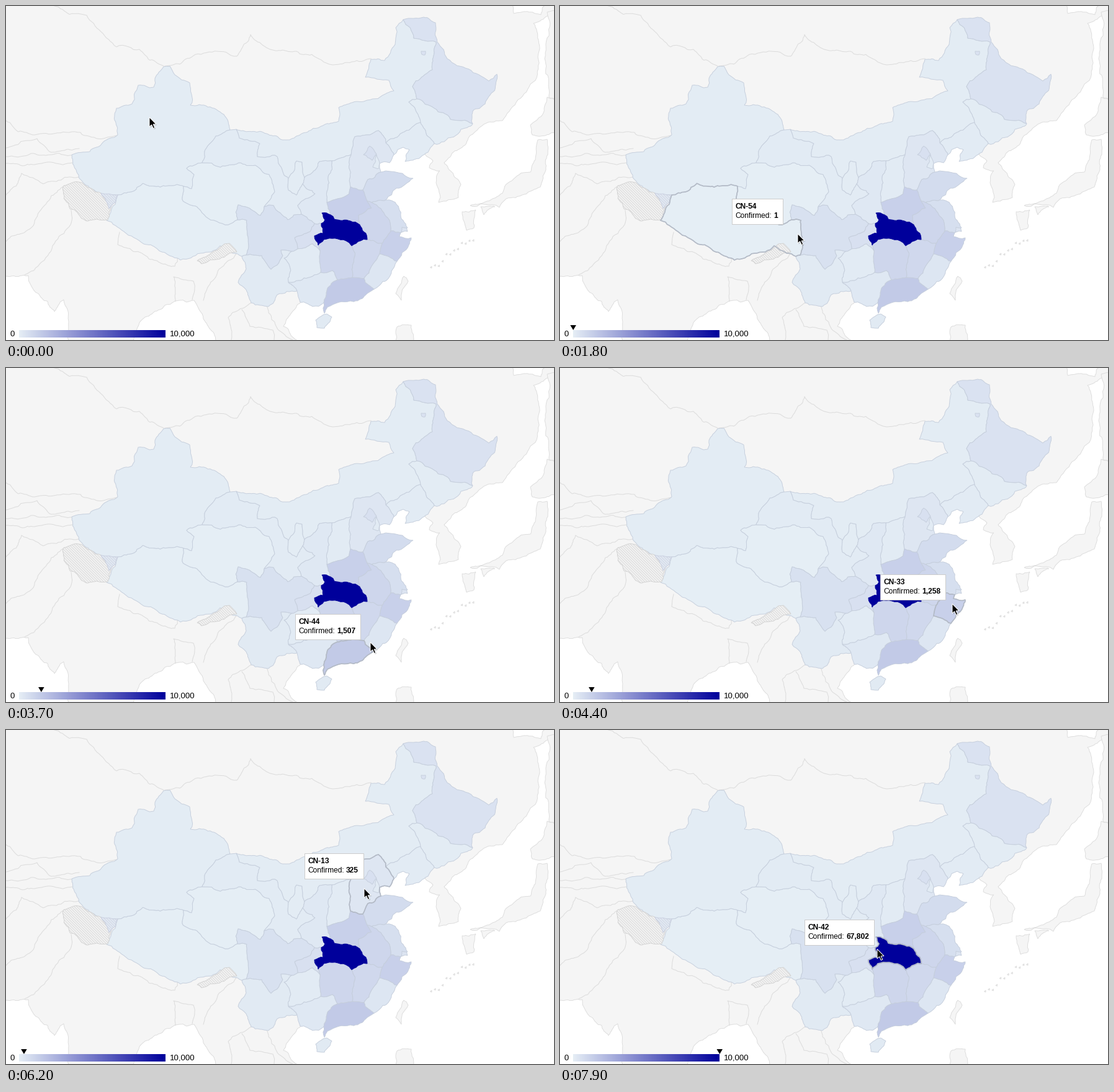
Recreate the animation shown at these times as a matplotlib script. Size 883 by 539 pixels, loop 8 s.

```python
import numpy as np
import matplotlib.pyplot as plt
from itertools import combinations
from matplotlib.animation import FuncAnimation
from matplotlib.patches import Polygon, Rectangle
from matplotlib.path import Path

W, H, DPI = 883, 539, 100
STEP, FRAMES = 100, 80
PT = 72 / DPI
LAND, LINE, EDGE = "#f5f5f5", "#dcdcdc", "#c5cedc"
LOW, HIGH = np.array([229, 238, 245]) / 255, np.array([0, 0, 155]) / 255
X0, X1 = 21, 257

fig = plt.figure(figsize=(W / DPI, H / DPI), dpi=DPI, facecolor=LAND)
ax = fig.add_axes([0, 0, 1, 1])
ax.axis("off")


def split(a, b, rng, wild):
    """Fractal midpoint displacement between two points, without the last one."""
    d = b - a
    if np.hypot(*d) < 5:
        return [a]
    mid = (a + b) / 2 + np.clip(rng.normal(0, wild), -0.15, 0.15) * np.array([-d[1], d[0]])
    return split(a, mid, rng, wild) + split(mid, b, rng, wild)


def rough(pts, wild=0.07):
    pts = np.array(pts, float).reshape(-1, 2)
    rng = np.random.default_rng(int(pts.sum()))
    out = []
    for a, b in zip(pts[:-1], pts[1:]):
        out += split(a, b, rng, wild)
    return np.array(out + [pts[-1]])


def line(*flat):
    p = rough(flat)
    ax.plot(p[:, 0], p[:, 1], color=LINE, lw=PT, zorder=2)


def area(*flat, fill=LAND, edge=LINE, z=1, **kw):
    p = rough(flat + flat[:2])
    return ax.add_patch(Polygon(p, fc=fill, ec=edge, lw=0.9 * PT, zorder=z, **kw))


def shade_of(count):
    return LOW + (HIGH - LOW) * min(count / 10000, 1)


# Seas; China is painted over the eastern one
area(-5, 435, 36, 435, 52, 464, 78, 493, 93, 474, 103, 545, -5, 545, fill="white")
area(204, 545, 215, 511, 256, 483, 303, 475, 318, 505, 342, 545, fill="white")
area(474, 545, 447, 517, 475, 478, 600, 420, 605, 300, 585, 260, 605, 235, 640, 222,
     675, 239, 688, 250, 682, 261, 699, 266, 693, 285, 697, 317, 729, 309, 733, 288,
     706, 253, 737, 226, 752, 207, 800, 185, 845, 126, 858, 55, 850, 28, 890, 8,
     890, 545, fill="white")
area(815, -5, 818, 12, 862, 14, 868, -5, fill="white")

# Islands
area(890, 5, 872, 10, 868, 85, 875, 148, 890, 152)
area(890, 158, 872, 147, 864, 176, 845, 192, 848, 208, 890, 202)
area(857, 216, 872, 215, 870, 264, 861, 292, 835, 304, 806, 311, 795, 325, 770, 320,
     748, 322, 800, 302, 818, 279, 845, 268, 853, 248)
area(735, 332, 757, 329, 754, 358, 742, 362)
area(765, 324, 788, 324, 770, 337)
area(641, 436, 648, 444, 637, 475, 628, 464)
area(630, 518, 653, 515, 657, 545, 630, 545)

rng = np.random.default_rng(4)
for u in np.linspace(0, 1, 12):
    x, y = 685 + 68 * u, 424 - 50 * u + rng.normal(0, 3)
    area(x - 1.5, y, x + 1, y - 2, x + 1, y + 1)

# Neighbouring frontiers
line(78, 0, 130, 15, 178, 66, 215, 70, 254, 97)
line(256, 97, 301, 81, 372, 81, 394, 46, 430, 71, 527, 95, 588, 85)
line(0, 185, 46, 208, 120, 204, 180, 209)
line(0, 229, 50, 214, 70, 235, 118, 230)
line(0, 243, 50, 240, 107, 241)
line(0, 254, 46, 256, 107, 253)
line(0, 305, 25, 270, 60, 287, 117, 276)
line(0, 380, 38, 360, 73, 306, 95, 290)
line(30, 434, 62, 410, 104, 353, 105, 330)
line(183, 365, 180, 385, 230, 408, 272, 420, 276, 404)
line(273, 477, 270, 437, 302, 444, 300, 474)
line(372, 398, 343, 425, 318, 475)
line(395, 479, 358, 503, 363, 539)
line(380, 490, 393, 517, 430, 523, 432, 539)
line(420, 484, 428, 506, 462, 539)

# Provinces: points where three areas meet, "--" being the outside, and the
# bends of the borders that run between two such points
points, bends = [], {}


def meet(names, x, y):
    points.append((set(names.split()), np.array([x, y], float)))


def bend(names, *flat):
    bends[frozenset(names.split())] = np.array(flat, float).reshape(-1, 2)


meet("XJ GS --", 361, 200)
meet("XJ GS QH", 316, 253)
meet("XJ QH XZ", 286, 291)
meet("XJ XZ --", 180, 305)
meet("GS NM --", 371, 199)
meet("GS NM NX", 455, 278)
meet("NM NX SN", 481, 277)
meet("NX SN GS", 478, 287)
meet("GS SN SC", 476, 336)
meet("GS SC QH", 416, 324)
meet("QH SC XZ", 373, 345)
meet("XZ SC YN", 387, 402)
meet("XZ YN --", 380, 404)
meet("YN GX --", 469, 460)
meet("YN GX GZ", 455, 446)
meet("YN GZ SC", 460, 396)
meet("SC GZ CQ", 470, 392)
meet("SC CQ SN", 497, 351)
meet("SN CQ HB", 508, 351)
meet("SN HB HA", 523, 337)
meet("CQ HB HN", 503, 386)
meet("CQ HN GZ", 506, 395)
meet("HN GZ GX", 507, 430)
meet("HN GX GD", 534, 442)
meet("HN GD JX", 558, 438)
meet("HN JX HB", 557, 387)
meet("HB JX AH", 582, 377)
meet("HB AH HA", 570, 353)
meet("GX GD --", 512, 479)
meet("GD JX FJ", 577, 440)
meet("GD FJ --", 593, 457)
meet("JX FJ ZJ", 602, 400)
meet("JX ZJ AH", 606, 383)
meet("ZJ AH JS", 620, 363)
meet("ZJ JS --", 636, 366)
meet("FJ ZJ --", 630, 412)
meet("AH JS SD", 589, 317)
meet("AH SD HA", 582, 315)
meet("JS SD --", 612, 313)
meet("SD HA HE", 575, 297)
meet("HA HE SX", 555, 292)
meet("HA SX SN", 517, 317)
meet("SX SN NM", 525, 250)
meet("SX NM HE", 556, 240)
meet("HE NM LN", 612, 221)
meet("HE LN --", 625, 240)
meet("HE SD --", 604, 268)
meet("LN NM JL", 668, 188)
meet("LN JL --", 690, 222)
meet("JL NM HL", 662, 150)
meet("JL HL --", 752, 190)
meet("HL NM --", 640, 22)

bend("XJ --", 136, 295, 118, 278, 106, 240, 135, 235, 180, 208, 178, 165, 203, 158,
     213, 128, 238, 131, 240, 117, 254, 98, 264, 97, 272, 111, 296, 124, 297, 160, 351, 175)
bend("XJ GS", 338, 210, 321, 232)
bend("XJ QH", 291, 262, 303, 272, 299, 295)
bend("XJ XZ", 265, 290)
bend("XZ --", 176, 320, 162, 346, 190, 364, 222, 384, 262, 402, 281, 410, 345, 387, 373, 400)
bend("XZ QH", 284, 312, 322, 340, 358, 353)
bend("XZ SC", 388, 346, 391, 388)
bend("GS NM", 376, 213, 409, 222, 405, 243, 437, 243, 447, 270)
bend("GS NX", 455, 297, 468, 305)
bend("GS SN", 498, 303, 470, 322)
bend("GS SC", 454, 345, 431, 322)
bend("GS QH", 433, 300, 424, 272, 375, 253)
bend("QH SC", 410, 338, 386, 324, 374, 321)
bend("NM NX", 468, 250, 477, 252)
bend("NM SN", 498, 265, 505, 251)
bend("NM HE", 562, 211, 586, 208, 600, 201)
bend("NM LN", 630, 212, 655, 195)
bend("NM JL", 664, 175, 649, 155)
bend("NM HL", 655, 130, 687, 103, 693, 58, 657, 52)
bend("NM --", 628, 35, 627, 62, 610, 88, 588, 86, 579, 115, 617, 120, 625, 137,
     582, 152, 536, 164, 536, 186, 457, 216)
bend("HL --", 673, 18, 692, 27, 711, 85, 778, 121, 791, 110, 772, 158, 752, 170)
bend("HL JL", 690, 165, 716, 183)
bend("JL --", 733, 199, 706, 219)
bend("LN --", 680, 236, 655, 249, 643, 251, 650, 232, 640, 228)
bend("HE --", 618, 253, 602, 254)
bend("HE SD", 583, 280)
bend("HE SX", 554, 265)
bend("SX SN", 519, 275)
bend("SX HA", 553, 303)
bend("SN HB", 509, 334, 514, 345)
bend("SC CQ", 490, 364, 465, 374)
bend("SC YN", 443, 394, 446, 403, 437, 418, 427, 425, 412, 403)
bend("YN GZ", 448, 407, 457, 420)
bend("YN --", 437, 466, 423, 485, 395, 479, 387, 458, 374, 446, 387, 424)
bend("GX GZ", 480, 439)
bend("GX HN", 526, 427)
bend("GX --", 494, 485, 474, 478)
bend("GZ CQ", 494, 384)
bend("CQ HB", 511, 367, 497, 371)
bend("HB HN", 512, 377, 548, 379)
bend("HB JX", 571, 379)
bend("HB HA", 555, 347, 529, 344)
bend("GD --", 555, 476, 518, 486, 513, 496)
bend("ZJ --", 649, 386, 653, 374, 634, 372)
bend("FJ --", 621, 431)
bend("JS --", 647, 358, 640, 346, 630, 321)
bend("JS AH", 618, 346, 604, 327)
bend("SD --", 620, 267, 656, 278, 629, 294)
bend("AH HA", 589, 326, 568, 338)


def borders():
    """Every pair of areas that share two meeting points has one border."""
    names = sorted(set().union(*(n for n, _ in points)))
    for pair in map(frozenset, combinations(names, 2)):
        ends = [p for n, p in points if pair <= n]
        if len(ends) != 2:
            continue
        a, b = ends
        mid = bends.get(pair, np.empty((0, 2)))
        if len(mid) and (np.hypot(*(a - mid[0])) + np.hypot(*(b - mid[-1]))
                         > np.hypot(*(b - mid[0])) + np.hypot(*(a - mid[-1]))):
            a, b = b, a
        yield pair, rough(np.vstack([a, mid, b]), 0.09 if "HB" in pair else 0.07)


lines = list(borders())


def ring(code):
    """Join all borders of a province end to end."""
    parts = [p for pair, p in lines if code in pair]
    out = parts.pop(0)
    while parts:
        ends = [(np.hypot(*(p[k] - out[-1])), i, k)
                for i, p in enumerate(parts) for k in (0, -1)]
        _, i, k = min(ends)
        p = parts.pop(i)
        out = np.vstack([out, p if k == 0 else p[::-1]])
    return out


class Province:
    def __init__(self, num, count, outline, z=3):
        self.label, self.count = f"CN-{num}", count
        self.path = Path(outline)
        color = shade_of(count)
        edge = color if count > 10000 else EDGE
        ax.add_patch(Polygon(outline, fc=color, ec=edge, lw=0.9 * PT, zorder=z))


provinces = []
for code, num, count in [
        ("XJ", 65, 76), ("XZ", 54, 1), ("QH", 63, 18), ("GS", 62, 136), ("NX", 64, 75),
        ("NM", 15, 97), ("HL", 23, 484), ("JL", 22, 95), ("LN", 21, 128), ("HE", 13, 325),
        ("SX", 14, 136), ("SN", 61, 253), ("SD", 37, 772), ("HA", 41, 1276),
        ("JS", 32, 645), ("AH", 34, 990), ("ZJ", 33, 1258), ("JX", 36, 937),
        ("HN", 43, 1018), ("CQ", 50, 579), ("SC", 51, 550), ("GZ", 52, 146),
        ("YN", 53, 183), ("GX", 45, 254), ("GD", 44, 1507), ("FJ", 35, 345),
        ("HB", 42, 67802)]:
    provinces.append(Province(num, count, ring(code)))


def enclave(num, count, *flat):
    provinces.append(Province(num, count, rough(flat + flat[:2])))


enclave(11, 569, 590, 249, 576, 240, 586, 226, 597, 239)
enclave(12, 136, 597, 240, 602, 254, 601, 262, 591, 260)
enclave(46, 168, 499, 507, 517, 497, 525, 502, 513, 520, 501, 519)
enclave(31, 414, 638, 357, 645, 358, 647, 364, 637, 365)
enclave(23, 484, 669, 73, 676, 73, 675, 79, 670, 78)

# Disputed areas
plt.rcParams["hatch.linewidth"] = 0.5
HATCH = dict(hatch="\\" * 8, z=5)
area(93, 290, 122, 285, 153, 302, 170, 322, 164, 345, 122, 343, 104, 328,
     fill="#f2f2f2", edge="#d2d2d2", **HATCH)
area(153, 302, 180, 305, 166, 327, fill="#e2e9f2", edge="#c9cfe0", **HATCH)
area(308, 411, 360, 383, 372, 397, 315, 416, fill="#f2f2f2", edge="#d2d2d2", **HATCH)

# Legend
ramp = np.linspace(0, 1, X1 - X0)[None, :, None]
ax.imshow(LOW + (HIGH - LOW) * ramp, extent=(X0, X1, 535, 523), aspect="auto", zorder=6)


def label(s, x=0, y=0, px=12, weight="normal", z=6):
    return ax.text(x, y, s, size=px * PT, family="Liberation Sans", weight=weight,
                   color="black", va="baseline", ha="left", zorder=z)


label("0", 6.5, 533, 13.3)
label("10,000", 264, 533, 13.3)
ax.set_xlim(0, W)
ax.set_ylim(H, 0)

# Moving parts
glow = ax.add_patch(Polygon([(0, 0), (1, 1)], fc="none", ec="#b3bac6", lw=1.7 * PT, zorder=7))
mark = ax.add_patch(Polygon([(0, 0), (1, 1)], fc="black", lw=0, zorder=7))
shadow = ax.add_patch(Rectangle((0, 0), 1, 41, fc="black", alpha=0.08, lw=0, zorder=8))
box = ax.add_patch(Rectangle((0, 0), 1, 41, fc="white", ec="#cccccc", lw=PT, zorder=9))
title = label("", weight="bold", z=10)
caption = label("Confirmed:", z=10)
number = label("", weight="bold", z=10)
hover_parts = [glow, mark, shadow, box, title, caption, number]

ARROW = np.array([(0, 0), (0, 15.5), (3.6, 12.2), (6.3, 18), (8.8, 17), (6.2, 11.4),
                  (11, 11.2)])
dim = ax.add_patch(Polygon(ARROW, fc="black", alpha=0.18, lw=0, zorder=11))
arrow = ax.add_patch(Polygon(ARROW, fc="black", ec="white", lw=PT, zorder=12))

# Pointer stops: ms, x, y; the tooltip trails the pointer by LAG ms
ROUTE = np.array([
    (200, 231, 180), (900, 253, 326), (1000, 253, 326), (2000, 415, 378),
    (2500, 410, 433), (2900, 418, 440), (3600, 581, 450), (3700, 587, 443),
    (4300, 632, 386), (4400, 632, 381), (4700, 625, 350), (5000, 601, 301),
    (5200, 601, 301), (5800, 597, 252), (6000, 597, 252), (6100, 589.5, 250),
    (6200, 577, 256), (6700, 545, 280), (6900, 545, 280), (7300, 550, 322),
    (7500, 529, 364), (7700, 529, 364), (7800, 518.5, 359), (7900, 511, 354)])
LAG = 80


def pointer(t):
    return np.array([np.interp(t, ROUTE[:, 0], ROUTE[:, k]) for k in (1, 2)])


def update(i):
    t = i * STEP
    tip = np.round(pointer(t)) + (0, -0.5)
    arrow.set_xy(tip + ARROW)
    dim.set_xy(tip + ARROW + (1.5, 1.5))

    spot = pointer(t - LAG)
    found = next((p for p in provinces[::-1] if p.path.contains_point(spot)), None)
    shown = found is not None and i > 0
    for part in hover_parts:
        part.set_visible(shown)
    if not shown:
        return

    glow.set_xy(found.path.vertices)
    x = X0 + (X1 - X0) * min(found.count / 10000, 1)
    mark.set_xy([(x - 4.5, 515), (x + 5, 515), (x + 0.3, 523)])

    value = f"{found.count:,}"
    em = sum(0.278 if c == "," else 0.556 for c in value)
    width = round(75 + 12 * em)
    left, top = np.round(spot) - (12 + width, 53)
    box.set_xy((left + 0.5, top + 0.5))
    box.set_width(width)
    shadow.set_xy((left + 1, top + 2))
    shadow.set_width(width + 1)
    title.set_text(found.label)
    title.set_position((left + 6.5, top + 17))
    caption.set_position((left + 6.5, top + 32))
    number.set_text(value)
    number.set_position((left + 68, top + 32))


anim = FuncAnimation(fig, update, frames=FRAMES, interval=STEP, repeat=True,
                     repeat_delay=0, init_func=lambda: update(0), blit=False)
plt.show()
```
